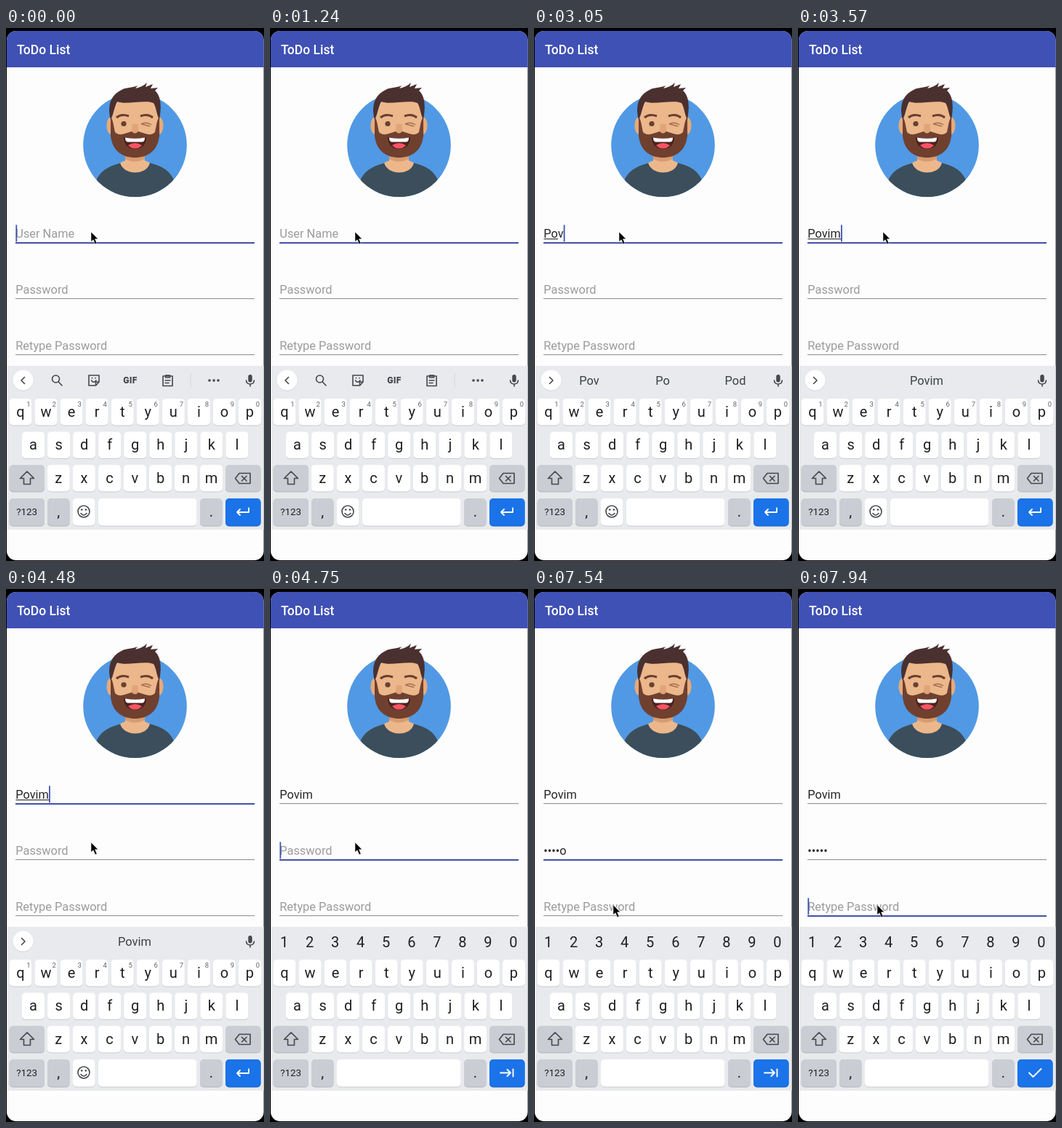
These frames come from a looping animation (355 by 732 pixels, 8 s). An HTML page:

```html
<!DOCTYPE html>
<html lang="en">
<head>
<meta charset="utf-8">
<title>Sign-up form</title>
<style>
  html, body { margin: 0; width: 100%; height: 100%; overflow: hidden; background: #000; }
  svg { display: block; width: 100%; height: 100%; font-family: Roboto, sans-serif; }
  .key { font-size: 20px; fill: #1f2023; text-anchor: middle; }
  .small { font-size: 9.5px; fill: #5f6368; text-anchor: middle; }
  .field { font-size: 16.35px; }
  .word { font-size: 16.4px; fill: #3c4043; text-anchor: middle; }
  .icon { fill: none; stroke: #44474b; stroke-width: 1.6; stroke-linecap: round; stroke-linejoin: round; }
  .white { stroke: #fff; stroke-width: 1.9; }
</style>
</head>
<body>
<svg id="stage" viewBox="0 0 355 732" preserveAspectRatio="none">
  <defs>
    <clipPath id="screen"><rect x="1" y="4" width="353.6" height="727" rx="13"/></clipPath>
    <clipPath id="disc"><circle cx="177.5" cy="160.8" r="71.3"/></clipPath>
  </defs>
  <rect width="355" height="732" fill="#000"/>
  <g clip-path="url(#screen)">
    <rect y="4" width="355" height="728" fill="#fdfdfd"/>
    <rect y="4" width="355" height="50" fill="#3f51b5"/>
    <text x="15" y="36" font-size="17.5" font-weight="500" fill="#fff">ToDo List</text>

    <g id="avatar">
      <circle cx="177.5" cy="160.8" r="71.3" fill="#5199e4"/>
      <g clip-path="url(#disc)">
        <path d="M118 240C120 202 132 191 163 184H193C224 191 235 202 237 240Z" fill="#3c4e5b"/>
        <path d="M164 162H191V182L198 185C194 203 162 203 157 185L164 182Z" fill="#ecb78b"/>
        <path d="M164 172Q177 184 191 172V180Q177 187 164 180Z" fill="#d79c70"/>
      </g>
      <ellipse cx="144" cy="134" rx="5.6" ry="11.5" fill="#e5aa7c"/>
      <ellipse cx="211" cy="134" rx="5.6" ry="11.5" fill="#e5aa7c"/>
      <path d="M145 105Q177 90 210 105V146Q207 174 178 174Q148 174 145 146Z" fill="#ecb78b"/>
      <path d="M144 123C147 124 148 134 150 143C156 149 163 145 170 143Q174 141 177.500 143Q181 141 185 143C192 145 199 149 205 143C207 134 208 124 211 123V148C209 170 193 178 177.500 178C162 178 146 170 144 148Z" fill="#70402f"/>
      <path d="M144 126C139 107 144 92 159 85C165 81 173 83 181 79L178 83Q188 81 194 75L192 81L202 77L199 83L209 82L205 86C214 94 214 110 211 126C207 119 207 109 203 103C190 98 165 106 153 101C149 108 148 119 144 126Z" fill="#4a302f"/>
      <path d="M162 150Q177.500 153 193 150C193 160 187 166 177.500 166S162 160 162 150Z" fill="#4b211f"/>
      <path d="M164 150.500Q177.500 153 191 150.500Q191 155.500 188 156.500H167Q164 155.500 164 150.500Z" fill="#fff"/>
      <path d="M168 161Q177.500 155 187 161Q183 165.500 177.500 165.500T168 161Z" fill="#fa5365"/>
      <path d="M174 132Q172 141 174 143Q177.500 146 181 143Q183 141 181 132Z" fill="#e0a577"/>
      <circle cx="162" cy="131.500" r="3.600" fill="#6a4030"/>
      <path d="M152 123Q159 117 169 121M185 121Q195 117 202 123" fill="none" stroke="#6b3e2f" stroke-width="3"/>
      <path d="M186 132Q193 128 200 133M187 132L198 135" fill="none" stroke="#a66f4f" stroke-width="1.500"/>
    </g>

    <g id="fields"></g>
    <rect id="compose" x="13.500" y="289.200" height="1.100" fill="#222"/>
    <rect id="caret" width="1.800" height="23" fill="#3f51b5"/>

    <rect y="464" width="355" height="225" fill="#e8eaed"/>
    <g id="tools">
      <g class="icon">
        <circle cx="68.500" cy="482" r="5"/><path d="M72.300 486L77 491"/>
        <path d="M114 477H128V486L123.500 491H114Z M128 486H123.500V491M117.500 484Q120.500 488.500 124 484M118.500 480.500V481M123 480.500V481"/>
        <path d="M216 478H229V491.500H216Z M219.500 477H225.500V480H219.500Z M219 484H226M219 487.500H224"/>
      </g>
      <text x="171" y="488" font-size="12" font-weight="900" fill="#44474b" text-anchor="middle" letter-spacing=".3">GIF</text>
      <rect x="253.500" y="474" width="1" height="20" fill="#d1d3d7"/>
      <g fill="#44474b"><circle cx="280" cy="484" r="1.800"/><circle cx="286" cy="484" r="1.800"/><circle cx="292" cy="484" r="1.800"/></g>
    </g>
    <g id="words"></g>
    <g id="bar">
      <circle cx="23.500" cy="484.500" r="14" fill="#c9cbd0"/>
      <circle cx="23.500" cy="483.800" r="14" fill="#fff"/>
      <path id="chevron" class="icon"/>
      <rect x="333.300" y="476" width="5.400" height="10.500" rx="2.700" fill="#44474b"/>
      <path class="icon" d="M330.500 484Q331 489 336 489T341.500 484M336 489V492"/>
    </g>
    <g id="digits"></g>
    <g id="keys"></g>
    <rect id="spaceShade" y="647" height="37.500" rx="5" fill="#c9cbd0"/>
    <rect id="space" y="646" height="37.500" rx="5" fill="#fff"/>
    <g id="emoji">
      <rect x="92" y="647" width="30.500" height="37.500" rx="5" fill="#c9cbd0"/>
      <rect x="92" y="646" width="30.500" height="37.500" rx="5" fill="#fff"/>
      <circle class="icon" cx="107" cy="664" r="8"/>
      <path class="icon" d="M103 666.500Q107 671.500 111 666.500"/>
      <circle cx="104.200" cy="661.500" r="1.300" fill="#44474b"/><circle cx="109.800" cy="661.500" r="1.300" fill="#44474b"/>
    </g>
    <path id="action" class="icon white"/>
  </g>
  <path id="mouse" d="M0 0V13.500L3.100 10.700L5.700 16.700L8.100 15.700L5.500 9.800H9.700Z" fill="#000" stroke="#fff" stroke-width=".5"/>
</svg>
<script>
const NS = "http://www.w3.org/2000/svg";
const LOOP = 8000;
const $ = id => document.getElementById(id);

function set(node, attrs) {
  for (const k in attrs) node.setAttribute(k, attrs[k]);
  return node;
}
function add(parent, tag, attrs, text) {
  const node = set(document.createElementNS(NS, tag), attrs);
  if (text) node.textContent = text;
  return parent.appendChild(node);
}
const show = (node, on) => set(node, { visibility: on ? "visible" : "hidden" });

// Form fields
const fields = ["User Name", "Password", "Retype Password"].map((hint, i) => {
  const y = 288 + i * 77, g = $("fields");
  return {
    hint, y,
    text: add(g, "text", { x: 13.3, y, class: "field" }),
    line: add(g, "rect", { x: 13, width: 329 })
  };
});
const ruler = add($("fields"), "text", { class: "field", visibility: "hidden" });
function widthOf(s) {
  ruler.textContent = s;
  return s ? ruler.getComputedTextLength() : 0;
}

// Keyboard
const keys = $("keys"), PITCH = 35.05, GREY = "#cbcdd4";
function key(x, y, w, h, fill = "#fff", shade = "#c9cbd0") {
  add(keys, "rect", { x, y: y + 1, width: w, height: h, rx: 5, fill: shade });
  add(keys, "rect", { x, y, width: w, height: h, rx: 5, fill });
}
const supers = [];
[["qwertyuiop", 20, 509], ["asdfghjkl", 37.5, 554.5], ["zxcvbnm", 72.3, 600]].forEach(([row, x0, y], r) => {
  [...row].forEach((ch, i) => {
    const x = x0 + i * PITCH;
    key(x - 15.5, y, 31, 36.5);
    add(keys, "text", { x, y: y + 24.5, class: "key" }, ch);
    if (r) return;
    const digit = String((i + 1) % 10);
    supers.push(add(keys, "text", { x: x + 11, y: 519.5, class: "small" }, digit));
    add($("digits"), "text", { x: x - 0.5, y: 491.5, class: "key" }, digit);
  });
});
key(4.5, 600, 48.5, 36.5, GREY, "#b4b6bc");
key(302, 600, 48.5, 36.5, GREY, "#b4b6bc");
key(4.5, 646, 48.5, 37.5, GREY, "#b4b6bc");
key(57, 646, 30.5, 37.5, GREY, "#b4b6bc");
key(267, 646, 30.5, 37.5, GREY, "#b4b6bc");
key(302, 646, 48.5, 37.5, "#1a73e8", "#1660c4");
add(keys, "path", { class: "icon", d: "M29 609L38.500 618.500H33.500V626.500H24.500V618.500H19.500Z" });
add(keys, "path", { class: "icon", d: "M321 611.500H336V625.500H321L315.500 618.500Z M324.500 615.500L331 622M331 615.500L324.500 622" });
add(keys, "text", { x: 28.7, y: 669, class: "key", style: "font-size:13.4px" }, "?123");
add(keys, "text", { x: 72.3, y: 671, class: "key" }, ",");
add(keys, "text", { x: 282.5, y: 671, class: "key" }, ".");

const words = [76, 177, 277].map(x => add($("words"), "text", { x, y: 490, class: "word" }));

const ACTIONS = {
  enter: "M334 659.500V665H318M322 661L318 665L322 669",
  tab: "M317 664.500H331M326.500 660L331 664.500L326.500 669M334.500 659.500V669.500",
  done: "M318 664.500L323.500 670L334.500 659"
};

// Each entry changes only the listed parts of the state
const steps = [
  [0, { focus: 0, values: ["", "", ""], caret: 1, under: 0, words: null, mouse: [117, 280], digits: 0, action: "enter" }],
  [280, { caret: 0 }], [840, { caret: 1 }], [1240, { caret: 0 }], [1830, { caret: 1 }], [2230, { caret: 0 }],
  [2630, { values: ["P", "", ""], caret: 1 }],
  [2750, { values: ["Po", "", ""], under: 1 }],
  [2900, { under: 2, words: ["Pov", "Po", "Pod"] }],
  [3050, { values: ["Pov", "", ""] }],
  [3170, { values: ["Povi", "", ""], under: 3, words: ["Povi", "Pov", "Pov"] }],
  [3290, { values: ["Povim", "", ""], under: 4, words: ["Povi", "Povi", "Pov"] }],
  [3570, { under: 5, words: ["", "Povim", ""] }],
  [3820, { mouse: [149, 344] }],
  [3970, { mouse: [173, 391], caret: 0 }],
  [4090, { mouse: [166, 402] }],
  [4210, { mouse: [134, 364] }],
  [4360, { mouse: [119, 350], caret: 1 }],
  [4480, { mouse: [117, 348] }],
  [4600, { focus: 1, under: 0 }],
  [4750, { digits: 1, action: "tab" }],
  [5150, { caret: 0 }], [5610, { caret: 1 }],
  [6040, { values: ["Povim", "H", ""] }],
  [6320, { values: ["Povim", "•e", ""] }],
  [6440, { values: ["Povim", "••l", ""] }],
  [6590, { values: ["Povim", "•••l", ""] }],
  [6870, { values: ["Povim", "••••o", ""] }],
  [7270, { caret: 0, mouse: [124, 352] }],
  [7420, { mouse: [113, 408] }],
  [7540, { mouse: [109, 434] }],
  [7820, { focus: 2, values: ["Povim", "•••••", ""], caret: 1 }],
  [7940, { action: "done" }]
];
const stateAt = t => Object.assign({}, ...steps.filter(s => s[0] <= t).map(s => s[1]));

function render(t) {
  const s = stateAt(t);
  fields.forEach((f, i) => {
    const value = s.values[i], on = s.focus === i;
    f.text.textContent = value || f.hint;
    set(f.text, { fill: value ? "#252525" : "#9b9b9b" });
    set(f.line, { y: f.y + 6.2, height: on ? 1.9 : 1, fill: on ? "#35439f" : "#858585" });
  });

  const typed = s.values[s.focus];
  set($("caret"), { x: 13.4 + widthOf(typed), y: fields[s.focus].y - 17.6 });
  show($("caret"), s.caret);
  set($("compose"), { width: widthOf(s.values[0].slice(0, s.under)) });

  show($("bar"), !s.digits);
  show($("tools"), !s.digits && !s.words);
  show($("words"), !s.digits && s.words);
  show($("digits"), s.digits);
  show($("emoji"), !s.digits);
  supers.forEach(n => show(n, !s.digits));
  words.forEach((w, i) => { w.textContent = s.words ? s.words[i] : ""; });
  set($("chevron"), { d: s.words ? "M21.500 479.500L26 484L21.500 488.500" : "M25.500 479.500L21 484L25.500 488.500" });

  const x = s.digits ? 92 : 127;
  for (const id of ["space", "spaceShade"]) set($(id), { x, width: 262.5 - x });
  set($("action"), { d: ACTIONS[s.action] });
  set($("mouse"), { transform: `translate(${s.mouse})` });
}

const start = performance.now();
function tick() {
  render((performance.now() - start) % LOOP);
  requestAnimationFrame(tick);
}
tick();
</script>
</body>
</html>
```
